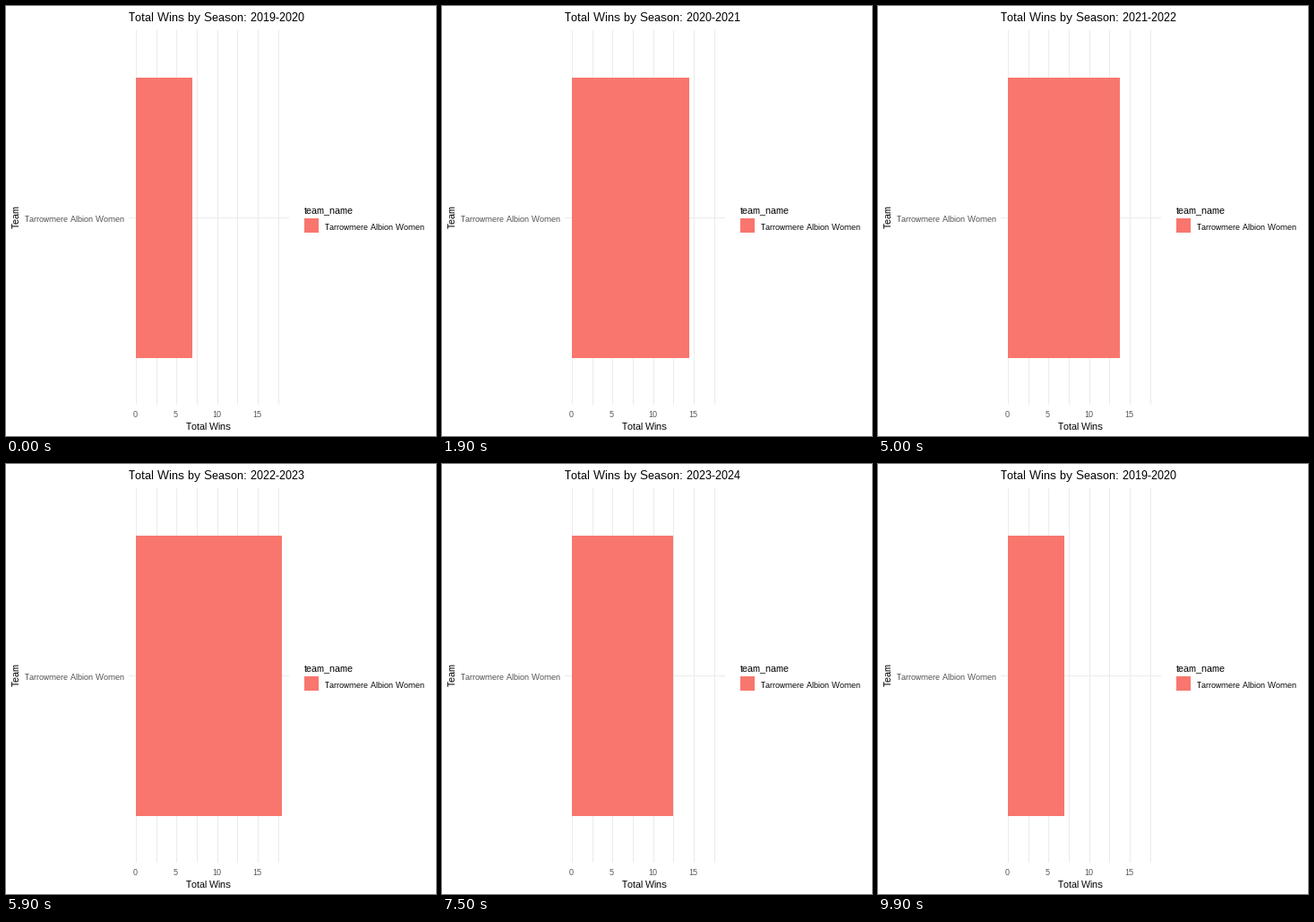
Write a matplotlib script that moves like this. It is 480 px wide and 480 px high and loops after 10 s.

```python
import matplotlib.pyplot as plt
import numpy as np
from matplotlib.animation import FuncAnimation
from matplotlib.patches import Rectangle

SIZE, DPI = 480, 100
FRAMES, INTERVAL = 100, 100
TEAM = "Tarrowmere Albion Women"
CORAL, GRID, GREY = "#F8766D", "#EBEBEB", "#4D4D4D"
ZERO_X, WIN_PX = 145, 9.06
SMALL, MEDIUM, LARGE = 9, 11, 13

# (frame, wins): holds alternating with linear moves between seasons
KEYS = [(0, 7), (6, 7), (20, 15), (27, 15), (40, 12), (47, 12),
        (48, 12 + 6 * 2 / 13), (59, 18), (66, 18), (79, 10), (86, 10), (99, 7)]
SEASON_STARTS = [13, 34, 53, 73, 93]

# Whole-pixel hinting without kerning
plt.rcParams.update({"font.family": "Liberation Sans", "text.hinting": "native",
                     "text.hinting_factor": 1, "text.kerning_factor": 6})
fig = plt.figure(figsize=(SIZE / DPI, SIZE / DPI), dpi=DPI, facecolor="white")
ax = fig.add_axes([0, 0, 1, 1])
ax.set(xlim=(0, SIZE), ylim=(SIZE, 0))
ax.axis("off")


def wins_to_x(wins):
    return round(ZERO_X + WIN_PX * wins)


def rect(x, y, width, height, color):
    return ax.add_patch(Rectangle((x, y), width, height, facecolor=color,
                                  linewidth=0, antialiased=False))


def label(x, y, text, px, color="black", ha="left", **kwargs):
    return ax.text(x, y, text, fontsize=px * 72 / DPI, color=color, ha=ha,
                   **{"va": "baseline", **kwargs})


for wins in np.arange(0, 18, 2.5):
    rect(wins_to_x(wins), 27, 1, 418, GRID)
rect(137, 236, 179, 1, GRID)
bar = rect(ZERO_X, 80, 63, 313, CORAL)

for wins in (0, 5, 10, 15):
    label(wins_to_x(wins) - 0.5, 459, str(wins), SMALL, GREY, "center")
label(132, 241, TEAM, SMALL, GREY, "right")
label(226, 473, "Total Wins", MEDIUM, ha="center")
label(16.5, 235.5, "Team", MEDIUM, ha="right", va="center", rotation=90)

label(333, 231, "team_name", MEDIUM)
rect(333, 237, 16, 16, CORAL)
label(356, 250, TEAM, SMALL)
title = label(137, 17, "", LARGE)


def update(frame):
    wins = np.interp(frame, *zip(*KEYS))
    bar.set_width(wins_to_x(wins) - ZERO_X)
    year = 2019 + sum(frame >= start for start in SEASON_STARTS) % 5
    title.set_text(f"Total Wins by Season: {year}-{year + 1}")
    return bar, title


anim = FuncAnimation(fig, update, frames=FRAMES, interval=INTERVAL,
                     repeat=True, repeat_delay=0)
plt.show()
```
